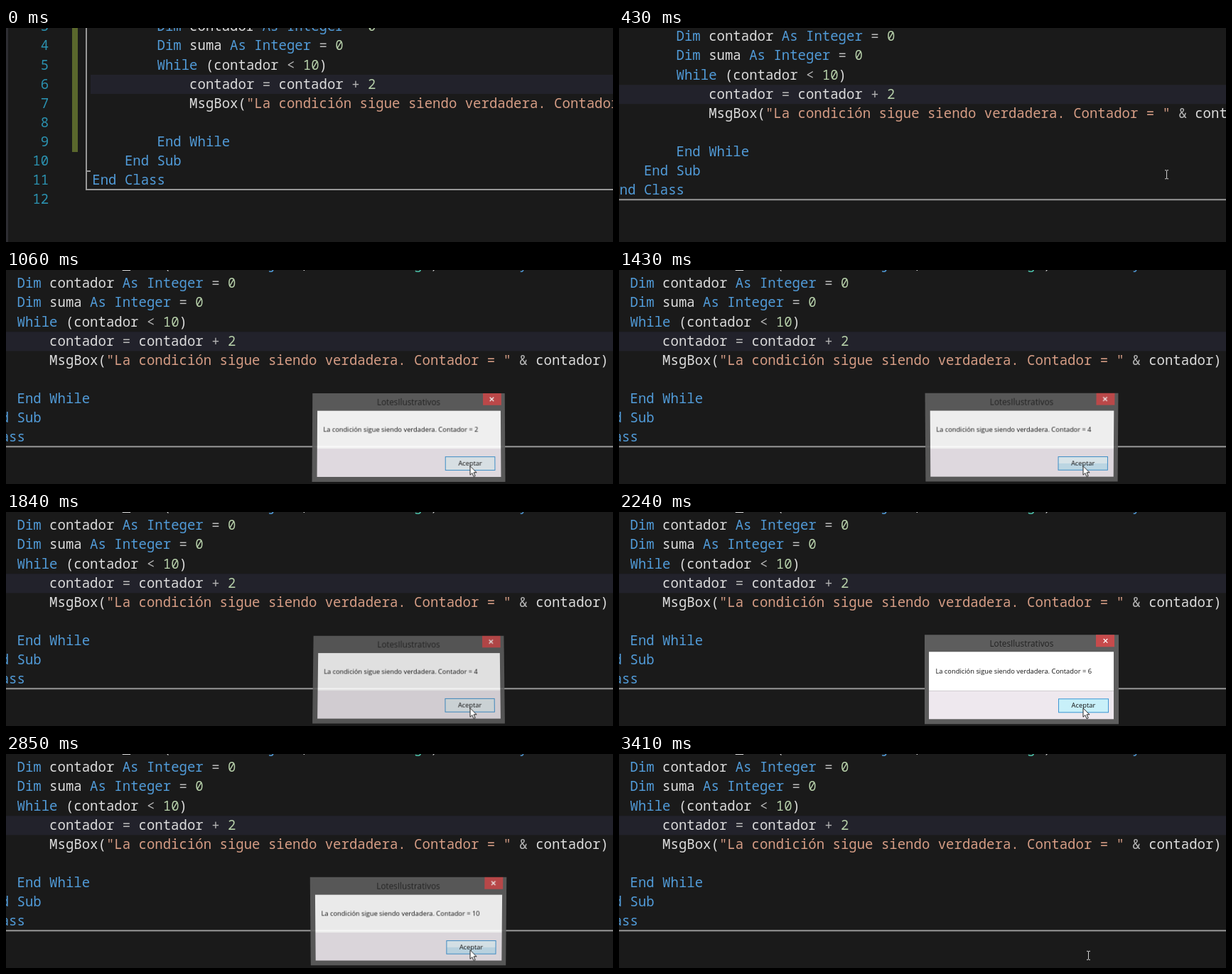
An HTML page that plays this animation: 854x302 px, repeating every 3.81 s.

```html
<!DOCTYPE html>
<html lang="es">
<head>
<meta charset="utf-8">
<style>
html, body { margin: 0; width: 100%; height: 100%; overflow: hidden; background: #1a1a1a; }
div, pre, svg { position: absolute; margin: 0; box-sizing: border-box; }
#stage { width: 854px; height: 302px; overflow: hidden; background: #1a1a1a; }
pre { top: -70px; font: 500 19px/27.12px "Noto Sans Mono", monospace; color: #dcdcdc; }
#code { left: 121.3px; }
#numbers { left: 37.3px; color: #2b91af; }
.key { color: #519bd8; }
.type { color: #4ec9b0; }
.str { color: #d69d85; }
.num { color: #b5cea8; }
.op { color: #b4b4b4; }
#edge { left: 0; top: -60px; width: 3px; height: 420px; background: #2d2d32; }
#changes { left: 93px; top: -60px; width: 8px; height: 235px; background: #5a672c; }
#current { left: 119px; top: 66.2px; width: 1000px; height: 27px; background: #22222b; }
#outline { left: 112px; top: -60px; width: 1100px; height: 289px; border: solid #989898; border-width: 0 0 2px 2px; }
#tick { left: 113px; top: 201px; width: 6px; height: 1.5px; background: #989898; }
#desk { left: 197px; top: -21.3px; }
#dialog { top: 173px; height: 126px; background: #5d5d5d; font: 9.35px/14px "Open Sans", sans-serif; color: #111; white-space: nowrap; }
#title { top: 4px; width: 100%; text-align: center; font-size: 11.8px; line-height: 17px; color: #222; }
#close { right: 5.5px; top: 0; width: 26px; height: 17px; background: #c74b4c; }
#close svg { left: 9.5px; top: 5px; }
#body { left: 6.5px; right: 6.5px; top: 24.5px; height: 55px; background: #fff; }
#footer { left: 6.5px; right: 6.5px; top: 79px; height: 40px; background: #eee8ee; }
#message { left: 9px; top: 20.5px; }
#button { right: 7.5px; top: 11px; width: 71px; height: 20px; line-height: 18px; text-align: center; border: 1px solid #3f95d2; }
</style>
</head>
<body>
<div id="stage">
  <div id="world">
    <div id="edge"></div>
    <div id="changes"></div>
    <div id="current"></div>
    <pre id="numbers"></pre>
    <pre id="code"></pre>
    <div id="outline"></div>
    <div id="tick"></div>
    <div id="desk">
      <div id="dialog">
        <div id="title">LotesIlustrativos</div>
        <div id="close"><svg width="7" height="7"><path d="M.7 .7 6.3 6.3M6.3 .7 .7 6.3" stroke="#fff" stroke-width="1.3"/></svg></div>
        <div id="body"><div id="message"></div></div>
        <div id="footer"><div id="button">Aceptar</div></div>
      </div>
      <svg id="cursor" width="20" height="20" overflow="visible">
        <path id="arrow" d="M0 0V12.5L2.9 9.8 5 14.8 7.2 13.9 5.1 9H9Z" fill="#fff" stroke="#111" stroke-width=".9"/>
        <path id="beam" d="M5 1.5H7L7.5 2 8 1.5H10M7.5 2V13M5 13.5H7L7.5 13 8 13.5H10" fill="none" stroke="#d0d0d0"/>
      </svg>
    </div>
  </div>
</div>
<script>
const LOOP = 3810;
const $ = id => document.getElementById(id);

// The first row is empty: it lies above the stage
const source = `
    Private Sub Form1_Load(sender As Object, e As EventArgs) Handles MyBase.Load
        Dim contador As Integer = 0
        Dim suma As Integer = 0
        While (contador < 10)
            contador = contador + 2
            MsgBox("La condición sigue siendo verdadera. Contador = " & contador)

        End While
    End Sub
End Class
`;
const rules = [
  ['str', /^"/],
  ['key', /^(Private|Sub|As|Object|Handles|MyBase|Dim|Integer|While|End|Class)$/],
  ['type', /^EventArgs$/],
  ['num', /^\d/],
  ['op', /^[=<+&]$/]
];
const paint = token => {
  const rule = rules.find(([, test]) => test.test(token));
  const text = token.replace('&', '&amp;').replace('<', '&lt;');
  return rule ? `<span class="${rule[0]}">${text}</span>` : text;
};
$('code').innerHTML = source.replace(/"[^"]*"|\w+|[=<+&]/g, paint);
$('numbers').textContent = Array.from({ length: 12 }, (_, i) => String(i + 1).padStart(2)).join('\n');

// value, opening, opened, pressed, closing, closed
const boxes = [
  [2, 510, 720, 1000, 1030, 1150],
  [4, 1270, 1490, 1690, 1793, 1923],
  [6, 1925, 2035, 2180, 2270, 2370],
  [8, 2375, 2490, 2540, 2610, 2710],
  [10, 2712, 2912, 3110, 3200, 3330]
];

const progress = (t, from, to) => Math.min(1, Math.max(0, (t - from) / (to - from)));
const easeInOut = p => p < .5 ? 4 * p ** 3 : 1 - 4 * (1 - p) ** 3;
const smooth = p => p * p * (3 - 2 * p);

function drawDialog(t, hovered) {
  const box = boxes.find(b => t >= b[1] && t < b[5]);
  $('dialog').style.display = box ? '' : 'none';
  $('arrow').style.display = box ? '' : 'none';
  $('beam').style.display = box ? 'none' : '';
  if (!box) return;

  const [value, opening, opened, pressed, closing, closed] = box;
  const away = (1 - progress(t, opening, opened)) ** 2 + progress(t, closing, closed) ** 2;
  const tilt = 38 * away * (t < closing ? -1 : 1);
  const width = value > 9 ? 278 : 273;
  Object.assign($('dialog').style, {
    left: 566.4 - width / 2 + 'px',
    width: width + 'px',
    opacity: 1 - away,
    transform: away ? `perspective(1000px) scale(${1 - .1 * away}) rotateX(${tilt}deg)` : 'none'
  });
  $('message').textContent = `La condición sigue siendo verdadera. Contador = ${value}`;
  $('button').style.background =
    !hovered ? '#e0e4e6' :
    t >= closing ? '#e6eef2' :
    t >= pressed ? '#c8f0f9' :
    'linear-gradient(#e6f3f9 50%, #c8e4f2 50%)';
}

function draw(now) {
  const t = now % LOOP;
  const pan = easeInOut(progress(t, 160, 640));
  const move = smooth(progress(t, 700, 1000));
  $('world').style.transform = `translate(${-197 * pan}px, ${21.3 * pan}px)`;
  $('cursor').style.transform = `translate(${698 - 45 * move}px, ${206 + 70.5 * move}px)`;
  drawDialog(t, move > .9);
}

const start = performance.now();
(function run() {
  draw(performance.now() - start);
  requestAnimationFrame(run);
})();
</script>
</body>
</html>
```
